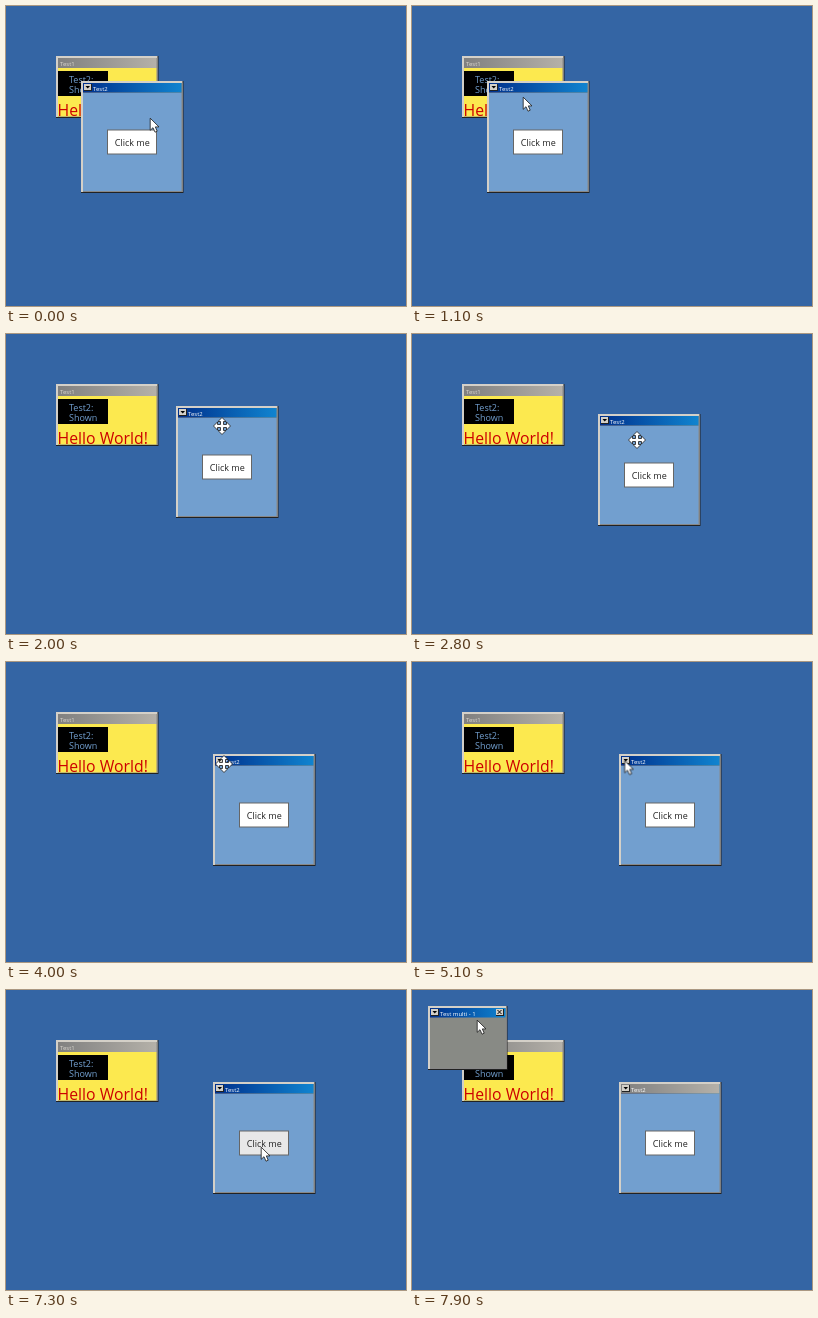
Write an HTML page that moves like this. It is 400 by 300 pixels and loops after 8 s.

```html
<!DOCTYPE html>
<html lang="en">
<head>
<meta charset="utf-8">
<title>Desktop windows</title>
<style>
html, body { margin: 0; width: 100%; height: 100%; overflow: hidden; background: #3465a4; }
svg { display: block; width: 400px; height: 300px; }
text { font-family: "Open Sans", "Noto Sans", sans-serif; }
.bar { font-size: 6px; fill: #fff; }
.label { font-size: 9px; }
.dim { fill: #dcd8d0; }
.dark { fill: #222; }
.face { fill: #d4d0c8; }
.edge { fill: #888; }
.body { fill: #729fcf; }

#win2, #cursor, .full, .shaded, .pressed, .arrow, .move, .blur, #multi, #hover {
  animation: 8s step-end -8ms infinite;
}
#win2 { animation-name: drag; }
#cursor { animation-name: pointer; }
.full { animation-name: unrolled; }
.shaded { animation-name: rolled; }
.pressed { animation-name: press; }
.arrow { animation-name: arrow; }
.move { animation-name: move; }
.blur, #multi { animation-name: opened; }
#hover { animation-name: hover; }

@keyframes drag {
  0% { transform: translate(75px, 75px); }
  18.75% { transform: translate(73px, 77px); }
  20% { transform: translate(139px, 74px); }
  21.25% { transform: translate(170px, 72px); }
  35% { transform: translate(186px, 80px); }
  36.25% { transform: translate(200px, 88px); }
  37.5%, 100% { transform: translate(207px, 92px); }
}
@keyframes pointer {
  0% { transform: translate(144px, 112px); }
  5% { transform: translate(141px, 118px); }
  6.25% { transform: translate(132px, 121px); }
  7.5% { transform: translate(122px, 117px); }
  8.75% { transform: translate(115px, 110px); }
  10% { transform: translate(112px, 106px); }
  12.5% { transform: translate(110px, 100px); }
  13.75% { transform: translate(111px, 91px); }
  15% { transform: translate(117px, 84px); }
  18.75% { transform: translate(116px, 86px); }
  20% { transform: translate(187.5px, 83.5px); }
  21.25% { transform: translate(209px, 80px); }
  23.75% { transform: translate(236px, 95px); }
  25% { transform: translate(216px, 92px); }
  31.25% { transform: translate(205px, 93px); }
  32.5% { transform: translate(208px, 96px); }
  35% { transform: translate(225px, 106px); }
  36.25% { transform: translate(238px, 113px); }
  37.5% { transform: translate(243px, 116px); }
  41.25% { transform: translate(239px, 105px); }
  43.75% { transform: translate(240px, 108px); }
  45% { transform: translate(241px, 110px); }
  47.5% { transform: translate(236px, 104px); }
  48.75% { transform: translate(226px, 101px); }
  50% { transform: translate(218px, 102px); }
  56.25% { transform: translate(224px, 102px); }
  57.5% { transform: translate(209px, 103px); }
  63.75% { transform: translate(212.5px, 98.5px); }
  65% { transform: translate(214.5px, 99px); }
  81.25% { transform: translate(222px, 111px); }
  82.5% { transform: translate(234px, 128px); }
  83.75% { transform: translate(246px, 142px); }
  85% { transform: translate(254px, 149px); }
  91.25% { transform: translate(255px, 157px); }
  92.5% { transform: translate(253px, 149px); }
  96.25% { transform: translate(190px, 106px); }
  97.5% { transform: translate(108px, 57px); }
  98.75%, 100% { transform: translate(65px, 30px); }
}
@keyframes unrolled { 0%, 76.25%, 100% { visibility: visible; } 68.75% { visibility: hidden; } }
@keyframes rolled { 0%, 76.25%, 100% { visibility: hidden; } 68.75% { visibility: visible; } }
@keyframes press {
  0%, 68.75%, 76.25%, 100% { visibility: hidden; }
  67.5%, 73.75% { visibility: visible; }
}
@keyframes arrow { 0%, 63.75%, 100% { visibility: visible; } 15% { visibility: hidden; } }
@keyframes move { 0%, 63.75%, 100% { visibility: hidden; } 15% { visibility: visible; } }
@keyframes opened { 0% { visibility: hidden; } 92.5%, 100% { visibility: visible; } }
@keyframes hover { 0%, 96.25%, 100% { fill: #fff; } 85% { fill: #e8e8e8; } }
</style>
</head>
<body>
<svg viewBox="0 0 400 300">
  <defs>
    <linearGradient id="active"><stop stop-color="#00308c"/><stop offset="1" stop-color="#1084d0"/></linearGradient>
    <linearGradient id="idle"><stop stop-color="#808080"/><stop offset="1" stop-color="#b5b1a9"/></linearGradient>
    <g id="roll">
      <rect class="dark" x="3" y="3" width="8" height="7"/>
      <rect class="face" x="3" y="3" width="7" height="6"/>
      <path d="M4.5 5H9L6.75 7.6Z"/>
    </g>
  </defs>

  <rect width="400" height="300" fill="#3465a4"/>

  <g id="win1" transform="translate(50 50)">
    <rect class="dark" width="102.5" height="62"/>
    <rect class="face" width="101.5" height="61"/>
    <rect class="edge" x="2" y="2" width="99.5" height="59"/>
    <rect x="2" y="2" width="98.5" height="10" fill="url(#idle)"/>
    <rect x="2" y="12" width="98.5" height="48.5" fill="#fce94f"/>
    <text class="bar dim" x="4" y="9.7">Test1</text>
    <rect x="2" y="15" width="50" height="25"/>
    <g class="label" fill="#729fcf">
      <text x="13" y="27">Test2:</text>
      <text x="13" y="37">Shown</text>
    </g>
    <text x="1.5" y="60" font-size="15.8" fill="#c00">Hello World!</text>
  </g>

  <g id="win2">
    <g class="full">
      <rect class="dark" width="102.5" height="112"/>
      <rect class="face" width="101.5" height="111"/>
      <rect class="edge" x="2" y="2" width="99.5" height="109"/>
      <rect class="body" x="2" y="12" width="98.5" height="98"/>
      <rect x="26" y="48.5" width="50" height="25" fill="#666"/>
      <rect id="hover" x="27" y="49.5" width="48" height="23" fill="#fff"/>
      <text class="label dark" x="33.8" y="65">Click me</text>
    </g>
    <g class="shaded">
      <rect class="dark" width="102.5" height="14"/>
      <rect class="face" width="101.5" height="13"/>
    </g>
    <rect x="2" y="2" width="98.5" height="9.5" fill="url(#active)"/>
    <rect class="blur" x="2" y="2" width="98.5" height="9.5" fill="url(#idle)"/>
    <use href="#roll"/>
    <g class="pressed">
      <rect class="dark" x="3" y="3" width="8" height="7"/>
      <rect class="edge" x="4" y="4" width="7" height="6"/>
      <path d="M5.5 6H10L7.75 8.6Z"/>
    </g>
    <text class="bar" x="12" y="9.7">Test2</text>
  </g>

  <g id="multi">
    <g transform="translate(16 16)">
      <rect class="dark" width="79.5" height="64"/>
      <rect class="face" width="78.5" height="63"/>
      <rect class="edge" x="2" y="2" width="76.5" height="61"/>
      <rect x="2" y="2" width="75.5" height="9.5" fill="url(#active)"/>
      <rect x="2" y="12" width="75.5" height="50" fill="#888a85"/>
      <use href="#roll"/>
      <text class="bar" x="12" y="9.7">Test multi - 1</text>
      <rect class="dark" x="68" y="3" width="8" height="7"/>
      <rect class="face" x="68" y="3" width="7" height="6"/>
      <path d="M69.5 4L73.5 8M73.5 4L69.5 8" stroke="#000"/>
    </g>
  </g>

  <g id="cursor" fill="#fff" stroke="#1a1a1a" stroke-width=".8">
    <path class="arrow" d="M.2 .2V12.3L3 9.7 5 14.2 7.2 13.2 5.3 8.9H9Z"/>
    <path class="move" d="M0-8.5 4-4.5H1.5V-1.5H4.5V-4L8.5 0 4.5 4V1.5H1.5V4.5H4L0 8.5-4 4.5H-1.5V1.5H-4.5V4L-8.5 0-4.5-4V-1.5H-1.5V-4.5H-4Z"/>
  </g>
</svg>
</body>
</html>
```
